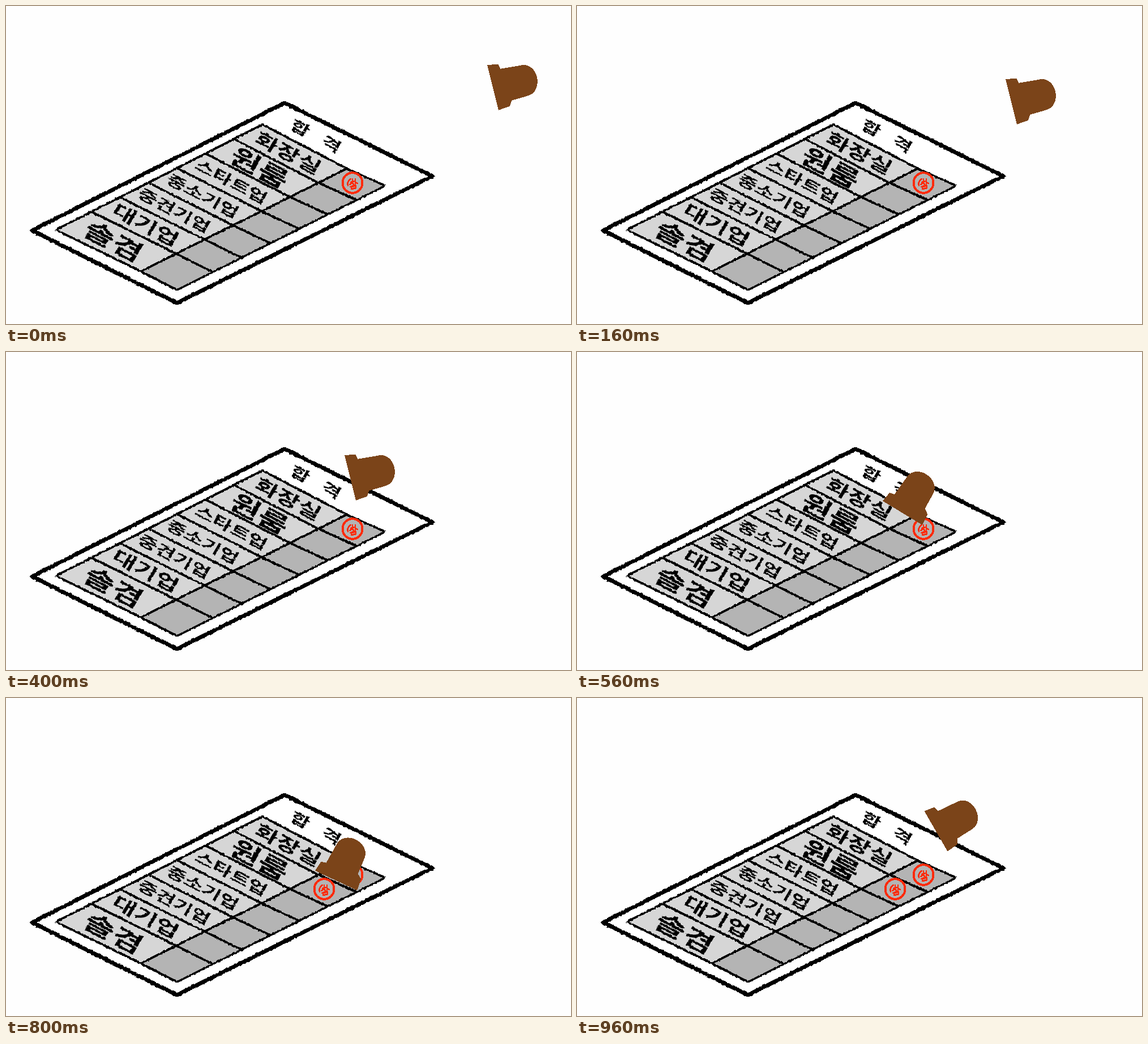
An HTML page for the animation above (3.28 s loop, 998 px wide and 561 px high).

```html
<!DOCTYPE html>
<html lang="ko">
<head>
<meta charset="utf-8">
<title>합격</title>
<style>
  html, body { margin: 0; width: 100%; height: 100%; overflow: hidden; background: #fefefe; }
  svg { display: block; width: 100%; height: 100%; shape-rendering: crispEdges; }
  text {
    font-family: "Noto Sans CJK KR", "Noto Sans CJK", sans-serif;
    font-weight: 700;
    text-anchor: middle;
    dominant-baseline: central;
    word-spacing: 17px;
  }
  .ink { fill: none; stroke: #000; stroke-width: 4; stroke-linejoin: round; }
</style>
</head>
<body>
<svg viewBox="0 0 998 561">
  <defs>
    <filter id="rough" x="0" y="0" width="998" height="561" filterUnits="userSpaceOnUse" color-interpolation-filters="sRGB">
      <feTurbulence type="fractalNoise" baseFrequency=".25" seed="4"/>
      <feDisplacementMap in="SourceGraphic" scale="4" xChannelSelector="R" yChannelSelector="G"/>
    </filter>
    <g id="seal" fill="none" stroke="#ff2a0a" stroke-width="4" stroke-linecap="round" stroke-linejoin="round">
      <ellipse rx="17.5" ry="17.8"/>
      <path d="M-8 5Q-10-3-3-7M-3-1L3-3M0-7V-3M-5 3Q0-2 2 3T-4 7M5-7V5M5-1L9 1M-2 6V11L6 9V5Z" stroke-width="2.8"/>
    </g>
  </defs>
  <g filter="url(#rough)">
    <path d="M492 171L753 300L302 524L46 396Z" fill="#fff" stroke="#000" stroke-width="7" stroke-linejoin="round"/>
    <path d="M453 209L602 287L238 468L88 395Z" fill="#d6d6d6"/>
    <path d="M602 287L670 317L302 501L238 468Z" fill="#b4b4b4"/>
    <path id="grid" class="ink"/>
    <g id="labels"></g>
  </g>
  <use href="#seal" x="612" y="312"/>
  <use href="#seal" id="newSeal" x="562" y="337"/>
  <path id="stamp" fill="#7b4419"
    d="M-41 0L-38-19L-29-21L-26-60Q-25-69-17-75Q-8-81 3-80Q16-79 24-70Q29-64 29-55L30-27L39-21L41 0Z"/>
</svg>
<script>
const $ = id => document.getElementById(id);
const mix = (a, b, p) => a.map((v, i) => v + (b[i] - v) * p);

// The three long lines of the table, each from its top end to its bottom end.
const left = [[453, 209], [88, 395]];
const divider = [[602, 287], [238, 468]];
const right = [[670, 317], [302, 501]];
const ROWS = 7, ROW = 0.138; // the last row takes the remainder
const rowTop = i => i < ROWS ? i * ROW : 1;

let grid = [left, divider, right].map(line => "M" + line.join("L")).join("");
for (let i = 0; i <= ROWS; i++) {
  grid += "M" + [left, divider, right].map(([top, bottom]) => mix(top, bottom, rowTop(i))).join("L");
}
$("grid").setAttribute("d", grid);

function addLabel(text, [x, y], size) {
  const node = document.createElementNS("http://www.w3.org/2000/svg", "text");
  node.textContent = text;
  node.setAttribute("transform", `matrix(.88 .46 -.34 .58 ${x} ${y})`);
  node.setAttribute("font-size", size);
  $("labels").append(node);
}

function cellCentre(i) {
  const p = (rowTop(i) + rowTop(i + 1)) / 2;
  const [x, y] = mix(mix(...left, p), mix(...divider, p), 0.5);
  return [x - 3, y - 3];
}

addLabel("합 격", [548, 228], 38);
["화장실", "원룸", "스타트업", "중소기업", "중견기업", "대기업", "솔겸"].forEach((text, i) => {
  const size = [0, 0, 60, 46, 38][text.length];
  addLabel(text, cellCentre(i), size);
});

// Poses of the stamp: centre of its base, then the tilt in degrees.
const pause = [767, 169, 76];
const track = [
  { step: 0, pose: [860, 144, 76] },
  { step: 2, pose: pause },
  { step: 3, pose: pause },
  { step: 5, pose: [608, 222, 76] },
  { step: 7, pose: [575, 284, 31] },
  { step: 8, pose: [562, 363, 0] },
  { step: 9, pose: [562, 345, 0] },
  { step: 10, pose: [583, 322, 25] },
  { step: 11, pose: [589, 269, 50] },
  { step: 12, pose: [634, 235, 60] }
];
const STEP = 80, LOOP = 3280, SEAL_STEP = 10;

function poseAt(step) {
  const next = track.findIndex(key => key.step > step);
  if (next < 0) return track.at(-1).pose;
  const a = track[next - 1], b = track[next];
  return mix(a.pose, b.pose, (step - a.step) / (b.step - a.step));
}

function draw(time) {
  const step = Math.floor(time % LOOP / STEP);
  const [x, y, tilt] = poseAt(step);
  $("stamp").setAttribute("transform", `translate(${x} ${y}) rotate(${tilt})`);
  $("newSeal").style.display = step < SEAL_STEP ? "none" : "";
}

const start = performance.now();
function tick() {
  draw(performance.now() - start);
  requestAnimationFrame(tick);
}
tick();
</script>
</body>
</html>
```
